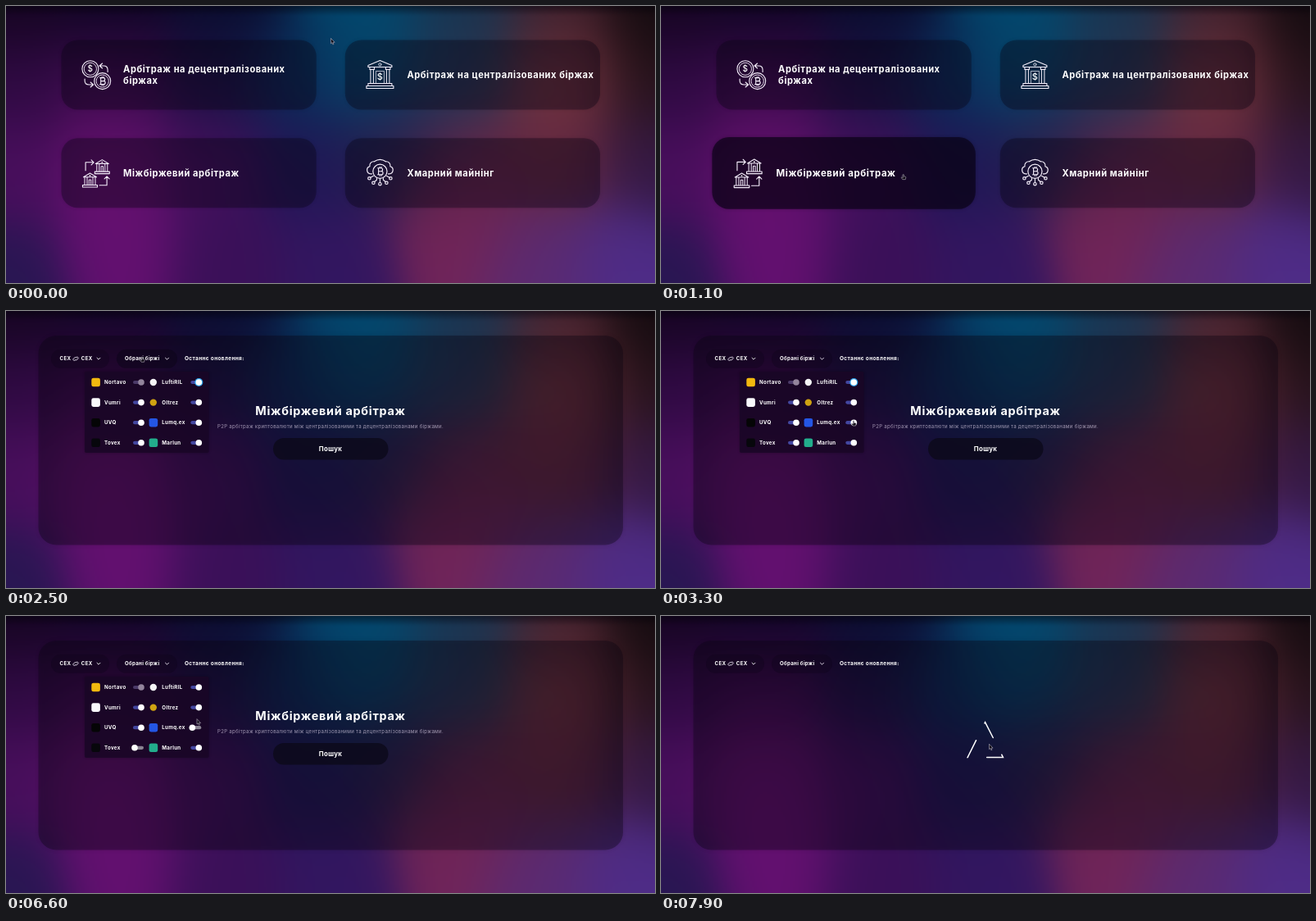
These frames come from a looping animation (792 px wide and 338 px high, 8 s). An HTML page with a canvas:

```html
<!DOCTYPE html>
<html lang="uk">
<head>
<meta charset="utf-8">
<title>Арбітраж</title>
<style>
html, body { margin: 0; width: 100%; height: 100%; overflow: hidden; background: #0c0418; }
canvas { display: block; width: 792px; height: 338px; }
</style>
</head>
<body>
<canvas id="stage"></canvas>
<script>
const W = 792, H = 338, LOOP = 8000, STEP = 100;
const canvas = document.getElementById('stage');
const dpr = window.devicePixelRatio || 1;
canvas.width = W * dpr;
canvas.height = H * dpr;
const ctx = canvas.getContext('2d');

const clamp = v => Math.max(0, Math.min(1, v));
const ramp = (t, a, b) => clamp((t - a) / (b - a));
const smooth = u => u * u * (3 - 2 * u);
const mix = (a, b, u) => a + (b - a) * u;

// ---------- background: soft blend between a few colour points ----------
const hues = [
  [0, 0, '#14041f'], [130, 0, '#0d0422'], [270, 0, '#080c2c'], [435, 0, '#01486e'],
  [560, 0, '#163450'], [670, 0, '#40202c'], [792, 0, '#120a0e'],
  [5, 90, '#300a44'], [130, 90, '#420c52'], [260, 90, '#1e1044'], [350, 80, '#0a2c58'],
  [440, 80, '#04466c'], [550, 85, '#283654'], [680, 90, '#743440'], [792, 90, '#26121a'],
  [0, 200, '#480e5c'], [130, 195, '#64106e'], [255, 190, '#42105c'], [370, 190, '#1e1756'],
  [470, 175, '#28204e'], [560, 200, '#622548'], [670, 190, '#642840'], [792, 190, '#341844'],
  [0, 330, '#281652'], [140, 295, '#641070'], [270, 310, '#3a1058'], [400, 310, '#321660'],
  [550, 280, '#732458'], [650, 310, '#5a2a72'], [760, 310, '#4e2c88']
].map(([x, y, hex]) => ({ x, y, rgb: [1, 3, 5].map(i => parseInt(hex.slice(i, i + 2), 16)) }));

function makeBackground() {
  const cell = 2, spread = 48;
  const c = document.createElement('canvas');
  c.width = W / cell;
  c.height = H / cell;
  const g = c.getContext('2d');
  const img = g.createImageData(c.width, c.height);
  for (let j = 0, k = 0; j < c.height; j++) {
    for (let i = 0; i < c.width; i++, k += 4) {
      const sum = [0, 0, 0];
      let total = 0;
      for (const { x, y, rgb } of hues) {
        const dx = (i + .5) * cell - x, dy = (j + .5) * cell - y;
        const w = Math.exp(-(dx * dx + dy * dy) / (2 * spread * spread));
        total += w;
        for (let n = 0; n < 3; n++) sum[n] += w * rgb[n];
      }
      for (let n = 0; n < 3; n++) img.data[k + n] = sum[n] / total;
      img.data[k + 3] = 255;
    }
  }
  g.putImageData(img, 0, 0);
  const top = g.createLinearGradient(0, 0, 0, 6);
  top.addColorStop(0, 'rgba(4,2,10,.5)');
  top.addColorStop(1, 'rgba(4,2,10,0)');
  g.fillStyle = top;
  g.fillRect(0, 0, c.width, 6);
  return c;
}
const background = makeBackground();

// ---------- helpers ----------
function box(x, y, w, h, r, fill, blur = 0) {
  ctx.save();
  if (blur) {
    ctx.shadowColor = 'rgba(0,0,0,.35)';
    ctx.shadowBlur = blur * dpr;
  }
  ctx.fillStyle = fill;
  ctx.beginPath();
  ctx.roundRect(x, y, w, h, r);
  ctx.fill();
  ctx.restore();
}

function disc(x, y, r, fill) {
  ctx.fillStyle = fill;
  ctx.beginPath();
  ctx.arc(x, y, r, 0, 7);
  ctx.fill();
}

function label(str, x, y, size, { weight = 700, color = '#fff', align = 'left' } = {}) {
  ctx.font = `${weight} ${size}px Inter, "Open Sans", sans-serif`;
  ctx.letterSpacing = size * .05 + 'px';
  ctx.textAlign = align;
  ctx.fillStyle = color;
  ctx.fillText(str, x, y);
}

function stroke(d, width = 1.1, color = '#f4eefa') {
  ctx.strokeStyle = color;
  ctx.lineWidth = width;
  ctx.lineJoin = ctx.lineCap = 'round';
  ctx.stroke(new Path2D(d));
}

function ring(x, y, r, width = 1.1) {
  ctx.strokeStyle = '#f4eefa';
  ctx.lineWidth = width;
  ctx.beginPath();
  ctx.arc(x, y, r, 0, 7);
  ctx.stroke();
}

// ---------- card icons, centred on 0,0 ----------
const dollar = (x, y, size) => label('$', x, y + size * .36, size, { weight: 500, align: 'center' });
const bitSign = (x, y) => {
  stroke(`M${x - 2} ${y - 4}V${y + 4}M${x - 3} ${y - 4}H${x + 1}a2 2 0 0 1 0 4H${x - 2}` +
    `M${x + 1} ${y}h.5a2 2 0 0 1 0 4H${x - 3}M${x - .5} ${y - 5.4}v1.4m2 -1.4v1.4` +
    `M${x - .5} ${y + 4}v1.4m2 -1.4v1.4`, 1.1);
};

function coins() {
  for (const [x, y] of [[-7.2, -7.2], [7.6, 7.6]]) {
    ring(x, y, 10);
    ring(x, y, 7.6, .9);
  }
  dollar(-7, -7.2, 10);
  bitSign(7.6, 7.6);
  stroke('M14 -3.5V-6Q14 -11 9 -11H5M7.5 -14L4 -11L7.5 -8');
  stroke('M-14 5V7Q-14 12 -9 12H-4M-7 9L-3.5 12L-7 15');
}

function bank() {
  stroke('M-14.5 -9.5V-11.5L0 -17.5L14.5 -11.5V-9.5ZM-16.5 16.5V13.5H16.5V16.5Z');
  stroke('M-14.5 13.5V10.5H14.5V13.5M-12.5 -9.5V-6.5H-7V-9.5M12.5 -9.5V-6.5H7V-9.5');
  stroke('M-11.5 -6.5V10.5M-8 -6.5V10.5M11.5 -6.5V10.5M8 -6.5V10.5', 1);
  stroke('M-5 10V-4.5H5V10', .7);
  ring(0, -12.6, 1.6, .9);
  dollar(.2, 2.4, 11);
}

function smallBank(x, y) {
  ctx.save();
  ctx.translate(x, y);
  stroke('M-8 -3.2L0 -8L8 -3.2ZM-9 9V6.5H9V9Z', 1.1);
  stroke('M-6.5 -3V6M-3.5 -3V6M-1.2 6V0H1.2V6M3.5 -3V6M6.5 -3V6', 1);
  disc(0, -5, .9, '#fff');
  ctx.restore();
}

function exchange() {
  smallBank(7.2, -8.2);
  smallBank(-7.6, 8.2);
  stroke('M-13 -3V-13H-3M-6 -16L-3 -13L-6 -10');
  stroke('M4 15H13V4M10 7L13 4L16 7');
}

function cloud() {
  stroke('M-10 1H-11a4.6 4.6 0 0 1 -1.5 -9a5 5 0 0 1 5.5 -6Q0 -19 7 -14a5 5 0 0 1 5.5 6a4.6 4.6 0 0 1 -1.5 9H10', 1.2);
  ring(0, -2, 8.6, 1.2);
  bitSign(.2, -2);
  stroke('M0 7V11.5M-4 6V8.5L-6.5 10.5M4 6V8.5L6.5 10.5M-8 3.5L-11.5 5.5M8 3.5L11.5 5.5', 1.1);
  for (const [x, y] of [[0, 13.4], [-8, 12], [8, 12], [-13, 6.5], [13, 6.5]]) ring(x, y, 1.7, 1.2);
}

const cards = [
  { x: 67.5, y: 41.5, icon: coins, lines: ['Арбітраж на децентралізованих', 'біржах'] },
  { x: 413.8, y: 41.5, icon: bank, lines: ['Арбітраж на централізованих біржах'] },
  { x: 67.5, y: 161.3, icon: exchange, lines: ['Міжбіржевий арбітраж'] },
  { x: 413.8, y: 161.3, icon: cloud, lines: ['Хмарний майнінг'] }
];
const CARD_W = 311.2, CARD_H = 85;

function drawCard({ x, y, icon, lines }, hover) {
  ctx.save();
  ctx.translate(x + CARD_W / 2, y + CARD_H / 2);
  const s = 1 + .033 * hover;
  ctx.scale(s, s);
  box(-CARD_W / 2, -CARD_H / 2, CARD_W, CARD_H, 20, `rgba(10,3,22,${mix(.34, .66, hover)})`, 4);
  ctx.save();
  ctx.translate(-113, 0);
  icon();
  ctx.restore();
  lines.forEach((line, i) => label(line, -80, 4 + (i - (lines.length - 1) / 2) * 13.3, 11.1));
  ctx.restore();
}

function drawMenu(t) {
  const hovers = [
    smooth(ramp(t, 250, 500)) * (1 - smooth(ramp(t, 500, 800))),
    0,
    smooth(ramp(t, 550, 1100)),
    0
  ];
  cards.forEach((card, i) => drawCard(card, hovers[i]));
}

// ---------- search screen ----------
const chevron = x => stroke(`M${x - 2} 57.2l2 2l2 -2`, .9);

// name, colour, round mark, time of switching off
const markets = [
  ['Nortavo', '#f2b90f', false],
  ['LuftiRIL', '#f4f4f6', true],
  ['Vumri', '#f8f8fb', false],
  ['Oltrez', '#cfa312', true],
  ['UVQ', '#050506', false],
  ['Lumq.ex', '#2456e4', false, 3500],
  ['Tovex', '#07070c', false, 5400],
  ['Marlun', '#22ad8c', false]
];

function drawToggle(x, y, on, disabled, focus) {
  const track = disabled ? '#4b3a68' : on > .5 ? '#4347a0' : '#8a8492';
  box(x, y - 2.1, 13, 4.2, 2.1, track);
  const kx = x + mix(2, 10, on);
  if (focus) disc(kx, y, 5.1, '#2ba0ea');
  disc(kx, y, 3.8, disabled ? '#93859c' : '#fff');
}

function drawDropdown(t) {
  box(96, 74, 151.5, 99, 2, 'rgba(26,7,40,.82)', 3);
  markets.forEach(([name, color, round, offAt], i) => {
    const x = 96 + (i % 2) * 70.3, y = 87 + (i >> 1) * 24.6;
    if (round) disc(x + 13.5, y, 4.2, color);
    else box(x + 8.3, y - 5.3, 10.6, 10.6, 2.4, color);
    label(name, x + 24, y + 2.2, 6.2);
    const on = offAt ? 1 - smooth(ramp(t, offAt, offAt + 150)) : 1;
    drawToggle(x + 59, y, on, i === 0, i === 1 && t < 3500);
  });
}

function drawLoader() {
  ctx.save();
  ctx.lineJoin = 'miter';
  ctx.strokeStyle = '#fff';
  ctx.lineWidth = 1.5;
  ctx.setLineDash([23.4, 23.2]);
  ctx.lineDashOffset = 2.2;
  ctx.stroke(new Path2D('M395.6 129.6L417.4 172.4H374.2Z'));
  ctx.restore();
}

function drawSearch(t) {
  box(39.5, 30, 713.5, 255.5, 22, 'rgba(9,3,20,.34)', 5);
  const hover = smooth(ramp(t, 1900, 2100)) * (1 - smooth(ramp(t, 2600, 2800)));
  box(55, 46.8, 71, 23, 11.5, 'rgba(12,4,24,.34)');
  box(135, 46.8, 74, 23, 11.5, `rgba(12,4,24,${.34 + .2 * hover})`);
  label('CEX', 65.5, 60.4, 6.2);
  label('CEX', 91.8, 60.4, 6.2);
  stroke('M84 60.2l-.6 .3a1.5 1.5 0 0 1 -1 -2.6l1.8 -1.3a1.5 1.5 0 0 1 2 .5M86 56.4l.8 -.4a1.5 1.5 0 0 1 .9 2.6l-1.7 1.2a1.5 1.5 0 0 1 -2 -.4', .8);
  chevron(113);
  label('Обрані біржі', 145, 60.4, 6.1);
  chevron(196.5);
  label('Останнє оновлення:', 218, 60.4, 6.5);

  if (t >= 7900) {
    drawLoader();
  } else {
    const press = smooth(ramp(t, 7500, 7700));
    label('Міжбіржевий арбітраж', 396, 127.2, 14.4, { align: 'center' });
    label('P2P арбітраж криптовалюти між централізованими та децентралізованами біржами.',
      396, 143.2, 6.05, { weight: 400, color: 'rgba(226,214,236,.68)', align: 'center' });
    box(326, 155, 140.5, 26.5, 13.2, `rgba(12,9,26,${.8 + .12 * press})`);
    label('Пошук', 396, 171, 7.9, { align: 'center' });
  }
  if (t >= 2500 && t < 6700) drawDropdown(t);
}

// ---------- pointer ----------
// time, x, y of the tip
const path = [
  [0, 396.5, 39.8], [900, 295.7, 205.4], [1600, 295.7, 205.4], [2100, 166, 56],
  [2500, 166, 56], [3100, 235, 133.8], [3500, 235, 133.8], [4300, 328, 117],
  [4700, 169.6, 150], [5200, 169.6, 150], [5500, 160, 157.5], [5800, 160, 157.5],
  [6200, 440, 60], [6600, 233, 126], [6700, 280, 134], [6800, 318, 92],
  [7000, 318, 92], [7700, 400.5, 156.6], [LOOP, 400.5, 156.6]
];
const handTimes = [[300, 500], [700, 1300], [2000, 2600], [3300, 3600], [5400, 5900], [7600, 7900]];

function drawPointer(t) {
  const i = path.findIndex(p => p[0] > t);
  const [t0, x0, y0] = path[i - 1], [t1, x1, y1] = path[i];
  const u = smooth(ramp(t, t0, t1));
  const hand = handTimes.some(([a, b]) => t >= a && t < b);
  ctx.save();
  ctx.translate(mix(x0, x1, u), mix(y0, y1, u));
  ctx.scale(.92, .92);
  const d = hand
    ? 'M-.7 .4Q0 -.4 .7 .4V2.8L2.8 3.2Q3.6 3.4 3.4 4.4L2.8 6.8H-1L-2.8 4.2Q-2.6 3.2 -.7 4.2Z'
    : 'M0 0V6.6L1.5 5.3L2.6 7.8L3.7 7.3L2.6 4.9H4.6Z';
  ctx.fillStyle = '#100c16';
  ctx.fill(new Path2D(d));
  stroke(d, .65, '#b8b2c0');
  ctx.restore();
}

// ---------- loop ----------
const start = performance.now();

function frame() {
  const elapsed = Math.max(0, performance.now() - start) % LOOP;
  const t = Math.floor(elapsed / STEP) * STEP;
  ctx.setTransform(dpr, 0, 0, dpr, 0, 0);
  ctx.drawImage(background, 0, 0, W, H);
  if (t < 1300) drawMenu(t);
  else drawSearch(t);
  drawPointer(t);
  requestAnimationFrame(frame);
}
frame();
</script>
</body>
</html>
```
